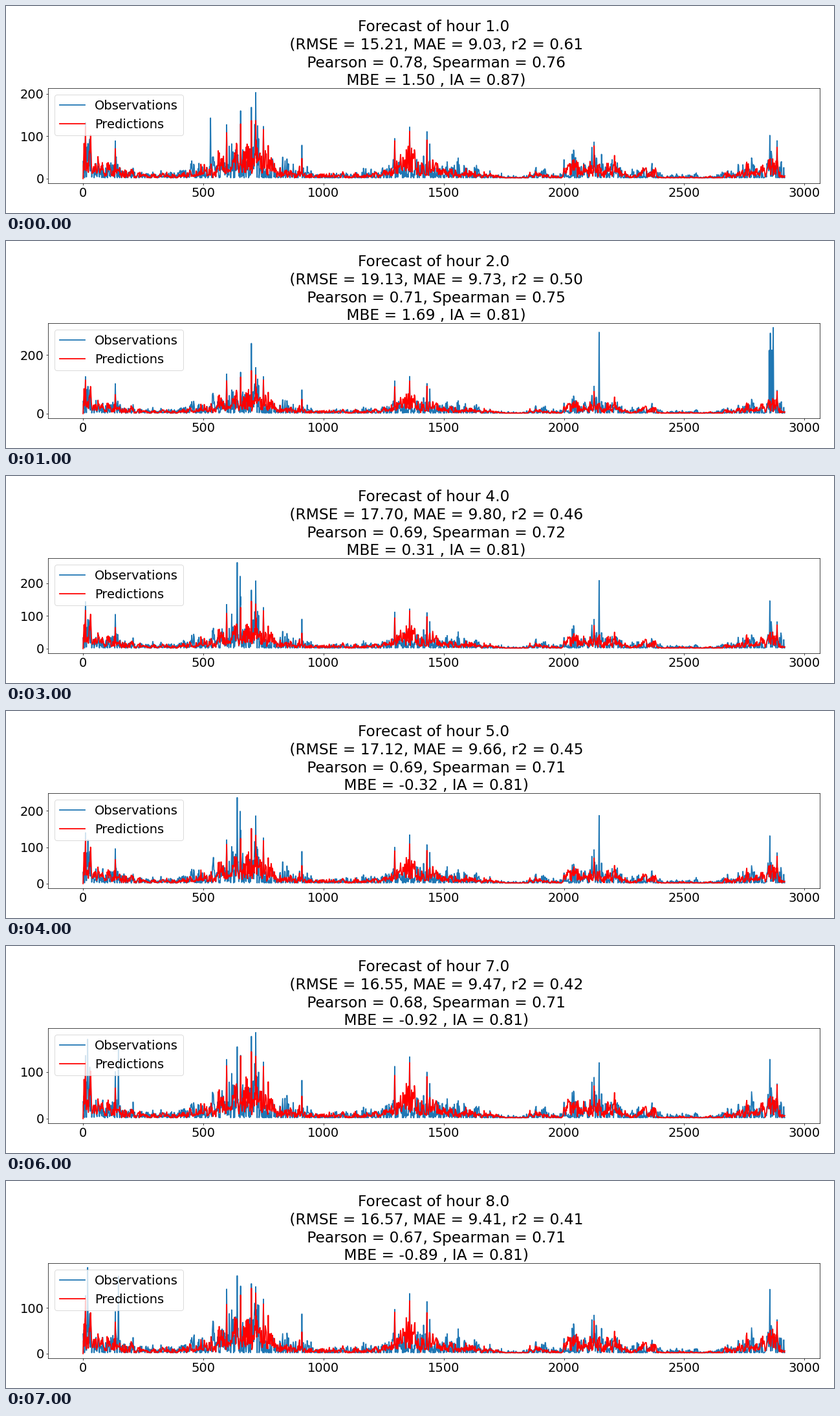
These frames come from a looping animation (1280x320 px, 8 s). A matplotlib script:

```python
import numpy as np
import matplotlib.pyplot as plt
from matplotlib.animation import FuncAnimation

W, H, DPI = 1280, 320, 64
N = 2919
HOURS = 8
X = np.arange(N)
plt.rcParams.update({"font.family": "DejaVu Sans", "font.size": 22})

# Upper limit of the predictions along the series: (position, value)
ENVELOPE = [(0, 125), (31, 125), (34, 72), (110, 55), (205, 55), (216, 16),
            (400, 18), (500, 45), (610, 95), (710, 120), (765, 95), (790, 45),
            (930, 38), (960, 18), (1240, 20), (1256, 62), (1350, 95),
            (1450, 80), (1530, 38), (1740, 12), (1770, 5), (1845, 5),
            (1860, 24), (1995, 12), (2002, 60), (2230, 60), (2245, 30),
            (2390, 28), (2405, 9), (2650, 9), (2740, 42), (2885, 65),
            (2918, 30)]

# Peaks that every hour shows, and the outliers of single hours
PEAKS = [(10, 145), (134, 105), (597, 145), (655, 165), (700, 183),
         (718, 170), (750, 140), (910, 90), (1296, 112), (1358, 142),
         (1430, 116), (2125, 95), (2886, 90)]
OUTLIERS = {1: [(530, 143), (718, 203), (2856, 102)],
            2: [(700, 239), (2146, 277), (2858, 274), (2870, 293)],
            3: [(986, 240), (1006, 229), (2146, 193), (2856, 179)],
            4: [(641, 263), (653, 221), (718, 207), (2146, 208), (2856, 146)],
            6: [(718, 205), (2146, 133), (2856, 139)],
            8: [(19, 189), (147, 170), (641, 171), (2856, 141)]}

# Dense runs of high readings: (start, end, value)
RUNS = {2: [(2853, 2870, 215)], 3: [(964, 993, 197), (1001, 1007, 196)]}

# RMSE, MAE, r2, Pearson, Spearman, MBE, IA
SCORES = {1: (15.21, 9.03, 0.61, 0.78, 0.76, 1.50, 0.87),
          2: (19.13, 9.73, 0.50, 0.71, 0.75, 1.69, 0.81),
          3: (20.34, 10.27, 0.42, 0.65, 0.72, 1.48, 0.78),
          4: (17.70, 9.80, 0.46, 0.69, 0.72, 0.31, 0.81),
          6: (16.54, 9.53, 0.43, 0.68, 0.71, -0.95, 0.82),
          8: (16.57, 9.41, 0.41, 0.67, 0.71, -0.89, 0.81)}

# Hours without own values lie between their neighbours
for h in (5, 7):
    SCORES[h] = tuple(np.mean([SCORES[h - 1], SCORES[h + 1]], axis=0))
    OUTLIERS[h] = [(x, 0.9 * v) for x, v in OUTLIERS[h - 1] + OUTLIERS[h + 1]]


def noise(hour, step, power, seed):
    """Random knots in 0..1, joined by lines and mostly shared by all hours."""
    n = N // step + 2
    shared = np.random.default_rng(seed).random(n)
    own = np.random.default_rng(seed + 100 * hour).random(n)
    return np.interp(X, np.arange(n) * step, (0.85 * shared + 0.15 * own) ** power)


def add_peak(y, x, v):
    y[x - 1:x + 2] = np.maximum(y[x - 1:x + 2], [0.6 * v, v, 0.6 * v])


def series(hour):
    rng = np.random.default_rng(hour)
    env = np.interp(X, *zip(*ENVELOPE))
    pred = env * (0.2 + 0.9 * noise(hour, 10, 1.4, 1)) * (0.08 + noise(hour, 2, 1, 2))
    obs = ((1.6 * env + 8) * (0.2 + 0.8 * noise(hour, 10, 1.6, 3))
           * noise(hour, 2, 2, 4))
    obs = np.minimum(obs, 165)

    for a, b, v in RUNS.get(hour, []):
        obs[a:b:2] = v
    for x, v in PEAKS:
        add_peak(obs, x, v * rng.uniform(0.82, 1))
        add_peak(pred, x, min(0.82 * v, 1.25 * env[x]) * rng.uniform(0.93, 1.03))
    for x, v in OUTLIERS[hour]:
        add_peak(obs, x, v)

    pred = np.maximum(pred, 2)
    pred[0] = 0
    return np.maximum(obs, 2), pred


def title_lines(hour):
    rmse, mae, r2, pearson, spearman, mbe, ia = SCORES[hour]
    return [f"Forecast of hour {hour:.1f}",
            f" (RMSE = {rmse:.2f}, MAE = {mae:.2f}, r2 = {r2:.2f}",
            f" Pearson = {pearson:.2f}, Spearman = {spearman:.2f}",
            f" MBE = {mbe:.2f} , IA = {ia:.2f})"]


DATA = [series(h) for h in range(1, HOURS + 1)]

fig = plt.figure(figsize=(W / DPI, H / DPI), dpi=DPI, facecolor="white")
ax = fig.add_axes([64.9 / W, 46.5 / H, 1193.6 / W, 146.3 / H])
obs_line, = ax.plot(X, DATA[0][0], color="#1f77b4", lw=2, label="Observations")
pred_line, = ax.plot(X, DATA[0][1], color="red", lw=2, label="Predictions")
ax.set_xlim(-0.05 * N, 1.05 * N)
ax.set_xticks(range(0, 3001, 500))
ax.legend(loc="upper left")
titles = [fig.text(661.4 / W, (H - 39.2 - 27.7 * i) / H, "", fontsize=26.3,
                   ha="center", va="baseline") for i in range(4)]


def update(i):
    obs, pred = DATA[i]
    obs_line.set_ydata(obs)
    pred_line.set_ydata(pred)
    top = obs.max()
    ax.set_ylim(-0.05 * top, 1.05 * top)
    ax.set_yticks(range(0, int(top) + 1, 200 if top > 280 else 100))
    for text, line in zip(titles, title_lines(i + 1)):
        text.set_text(line)
    return [obs_line, pred_line, *titles]


anim = FuncAnimation(fig, update, frames=HOURS, interval=1000,
                     repeat=True, repeat_delay=0, blit=False)
plt.show()
```
